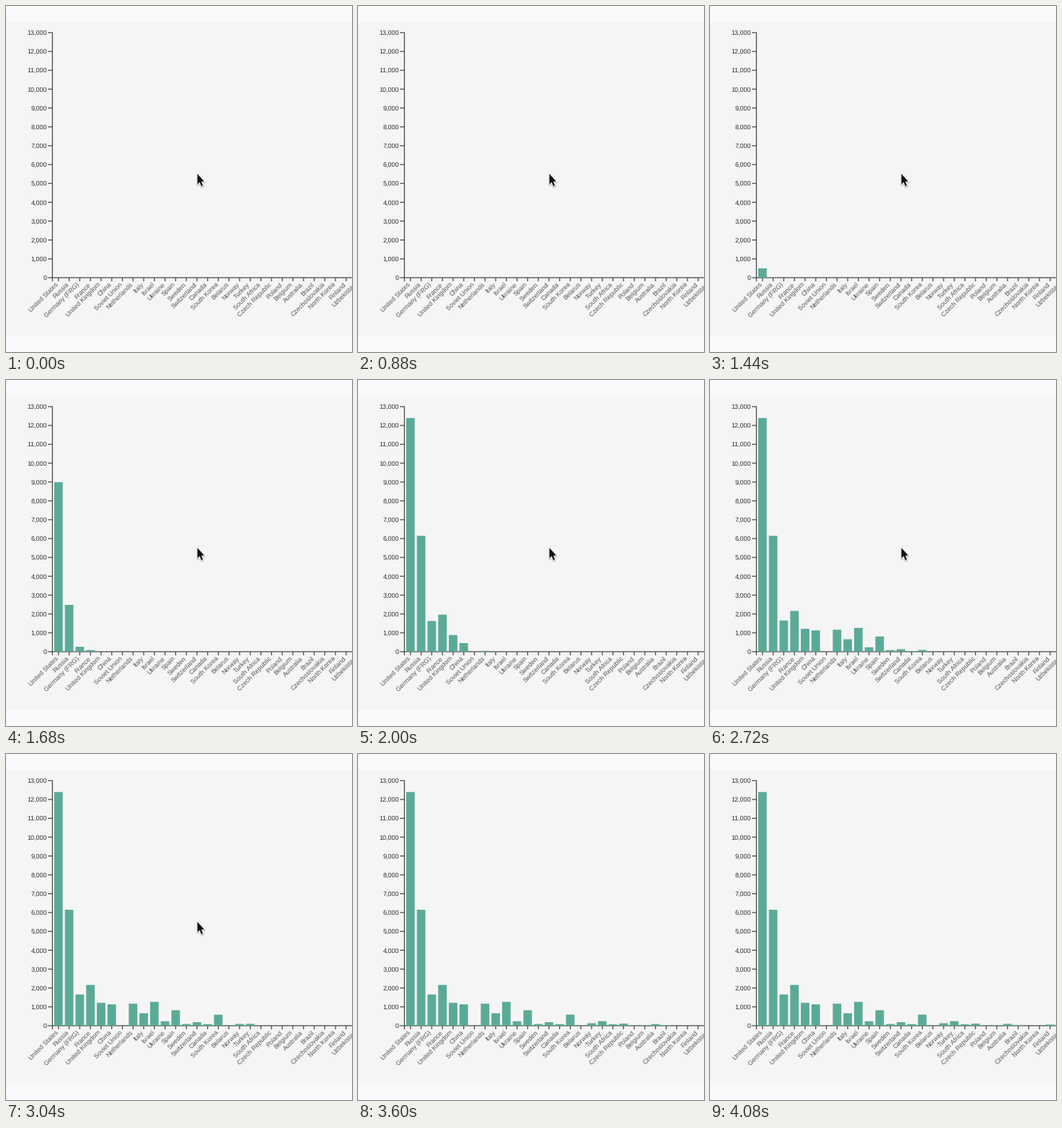
Recreate the animation shown at these times as a matplotlib script. Size 480 by 480 pixels, loop 4.16 s.

```python
import matplotlib.pyplot as plt
from matplotlib.animation import FuncAnimation
from matplotlib.patches import Polygon, Rectangle

SIZE, DPI = 480, 100
STEP_MS, FRAMES = 80, 52
LEFT, TOP, BASE = 64.4, 36.9, 376.9
Y_MAX = 13000
BAND, BAR_W, FIRST = 14.78, 11.8, 72.8
START, DELAY, DURATION = 1302, 80, 640
CURSOR_HIDE = 3360
PANEL, INK, LINE, GREEN = "#f5f5f6", "#2c2c2c", "#4c4c4c", "#5baa97"

DATA = [
    ("United States", 12394), ("Russia", 6148), ("Germany (FRG)", 1653),
    ("France", 2162), ("United Kingdom", 1214), ("China", 1131),
    ("Soviet Union", 0), ("Netherlands", 1167), ("Italy", 660),
    ("Israel", 1263), ("Ukraine", 235), ("Spain", 820), ("Sweden", 90),
    ("Switzerland", 185), ("Canada", 85), ("South Korea", 590),
    ("Belarus", 15), ("Norway", 130), ("Turkey", 240), ("South Africa", 75),
    ("Czech Republic", 110), ("Poland", 15), ("Belgium", 18),
    ("Australia", 95), ("Brazil", 40), ("Czechoslovakia", 0),
    ("North Korea", 5), ("Finland", 60), ("Uzbekistan", 0),
]

plt.rcParams["font.family"] = "Liberation Sans"
plt.rcParams["text.hinting"] = "none"
plt.rcParams["text.hinting_factor"] = 1


def pt(px):
    return px * 72 / DPI


def y_pos(value):
    return BASE - value * (BASE - TOP) / Y_MAX


def ease(t):
    t = min(max(t, 0), 1)
    return 4 * t**3 if t < 0.5 else 1 - 4 * (1 - t) ** 3


fig = plt.figure(figsize=(SIZE / DPI, SIZE / DPI), dpi=DPI, facecolor="#f9fafc")
ax = fig.add_axes([0, 0, 1, 1])
ax.set_xlim(0, SIZE)
ax.set_ylim(SIZE, 0)
ax.axis("off")


def line(xs, ys):
    ax.plot(xs, ys, color=LINE, lw=pt(1.3), solid_capstyle="butt",
            solid_joinstyle="miter", snap=False, zorder=2)


def label(x, y, text, size, color, **kw):
    ax.text(x, y, text, fontsize=pt(size), color=color, ha="right",
            va="baseline", zorder=4, clip_on=True, **kw)


ax.add_patch(Rectangle((0, 20.5), SIZE, 438.5, fc=PANEL, lw=0, zorder=0))

# Axes
line([58.2, LEFT, LEFT, 58.2], [TOP, TOP, BASE, BASE])
line([LEFT, LEFT, SIZE], [BASE + 5, BASE, BASE])
for value in range(0, Y_MAX + 1, 1000):
    y = y_pos(value)
    if 0 < value < Y_MAX:
        line([58.2, LEFT], [y, y])
    label(56.8, y + 3.1, f"{value:,}", 9, INK)

bars = []
for i, (name, _) in enumerate(DATA):
    x = FIRST + i * BAND
    line([x, x], [BASE, BASE + 5])
    label(x + 0.4, BASE + 9.9, name, 8.7, "#5a5a5a",
          rotation=45, rotation_mode="anchor")
    bar = Rectangle((x - BAR_W / 2, BASE), BAR_W, 0, fc=GREEN, lw=0,
                    snap=False, zorder=3)
    bars.append(ax.add_patch(bar))

# Mouse pointer
ARROW = [(265.5, 232.8), (265.5, 247.4), (268.7, 244.4), (270.9, 250),
         (273.2, 249), (270.9, 243.6), (275, 243.4)]


def pointer_part(color, width, alpha=1, drop=0):
    points = [(x + drop / 3, y + drop) for x, y in ARROW]
    return ax.add_patch(Polygon(points, fc=color, ec=color, lw=pt(width),
                                alpha=alpha, joinstyle="round", zorder=5))


pointer = [pointer_part("black", 4, 0.07, 1), pointer_part("black", 2.4, 0.12, 1),
           pointer_part("white", 1.8), pointer_part("#111111", 0)]


def update(frame):
    now = frame * STEP_MS
    for i, (bar, (_, value)) in enumerate(zip(bars, DATA)):
        shown = value * ease((now - START - i * DELAY) / DURATION)
        bar.set_y(y_pos(shown))
        bar.set_height(BASE - y_pos(shown))
    for part in pointer:
        part.set_visible(now < CURSOR_HIDE)
    return bars + pointer


anim = FuncAnimation(fig, update, frames=FRAMES, interval=STEP_MS,
                     repeat=True, repeat_delay=0, blit=False)
plt.show()
```
